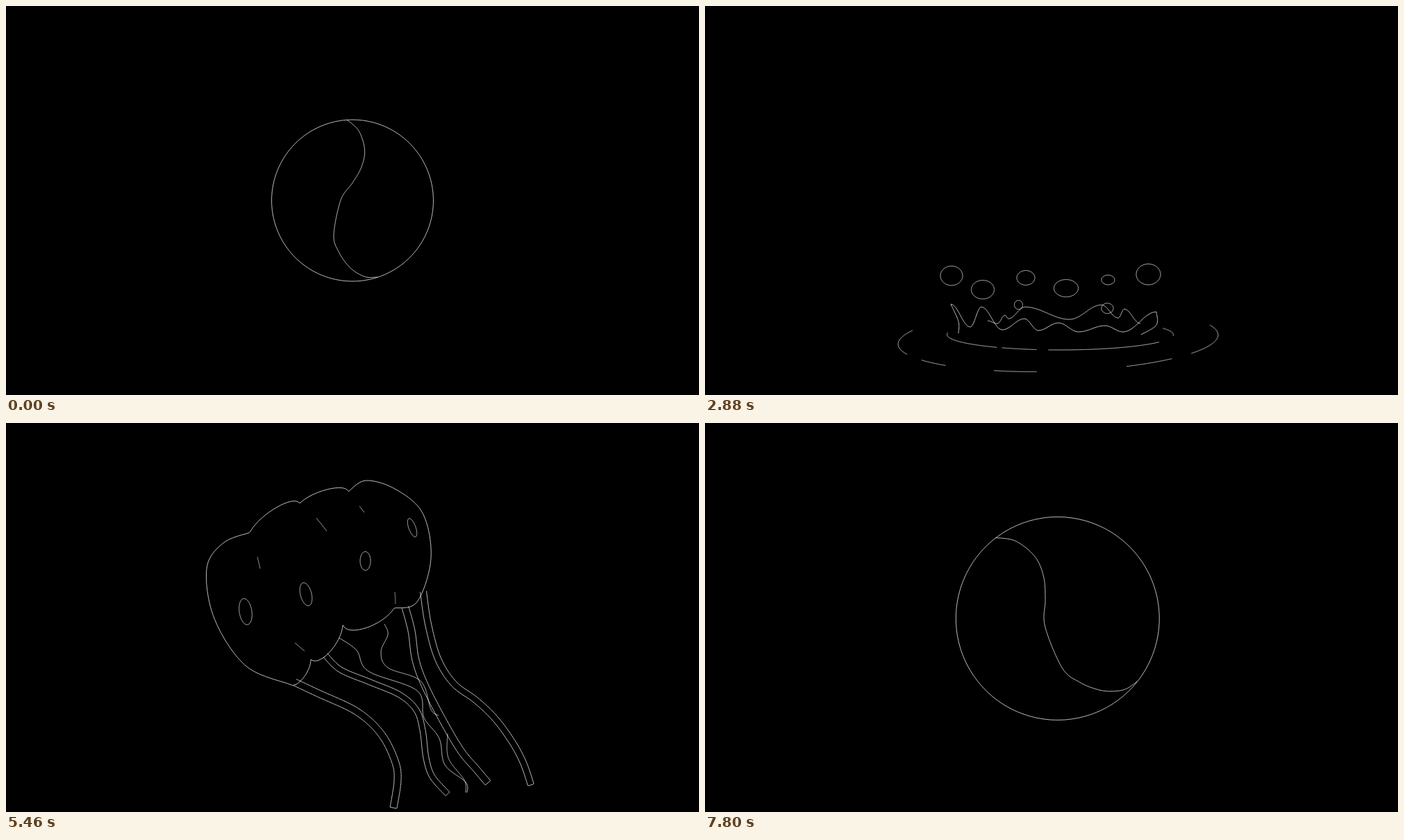
Recreate the animation shown at these times as an HTML page with a canvas. Size 998x561 px, loop 7.86 s.

```html
<!DOCTYPE html>
<html lang="en">
<head>
<meta charset="utf-8">
<title>Line morph</title>
<style>
html, body { margin: 0; width: 100%; height: 100%; overflow: hidden; background: #000; }
canvas { display: block; }
</style>
</head>
<body>
<canvas id="stage" width="998" height="561"></canvas>
<script>
const ctx = document.getElementById('stage').getContext('2d');
const LOOP = 7860, STEP = 60, SAMPLES = 400;
const clamp = (v, lo = 0, hi = 1) => Math.max(lo, Math.min(hi, v));
const mix = (a, b, u) => a + (b - a) * u;
const ease = u => u * u * (3 - 2 * u);
const range = (n, make) => Array.from({ length: n }, (_, k) => make(k));
const around = (p, x, y, s, angle = 0) => {
  const c = Math.cos(angle) * s, n = Math.sin(angle) * s, dx = p[0] - x, dy = p[1] - y;
  return [x + dx * c - dy * n, y + dx * n + dy * c];
};

// Spread points evenly along a polyline so that any two strokes can be blended.
function resample(line) {
  const at = [0];
  for (let i = 1; i < line.length; i++)
    at.push(at[i - 1] + Math.hypot(line[i][0] - line[i - 1][0], line[i][1] - line[i - 1][1]));
  const total = at[at.length - 1];
  let i = 1;
  return range(SAMPLES, k => {
    const d = total * k / (SAMPLES - 1);
    while (i < line.length - 1 && at[i] < d) i++;
    const u = clamp((d - at[i - 1]) / (at[i] - at[i - 1] || 1));
    return [mix(line[i - 1][0], line[i][0], u), mix(line[i - 1][1], line[i][1], u)];
  });
}

// Smooth stroke through "x,y" key points; "!" marks a corner.
function curve(text) {
  const pts = text.trim().split(/\s+/).map(s => [...s.replace('!', '').split(',').map(Number), s.endsWith('!')]);
  return pts.slice(1).flatMap((c, i) => {
    const b = pts[i], a = b[2] ? b : pts[i - 1] || b, d = c[2] ? c : pts[i + 2] || c;
    return range(13, k => {
      const u = k / 12;
      return [0, 1].map(j => b[j] + u / 2 * (c[j] - a[j] +
        u * (2 * a[j] - 5 * b[j] + 4 * c[j] - d[j] + u * (3 * (b[j] - c[j]) + d[j] - a[j]))));
    });
  });
}

// Ellipse or part of one, angles in degrees.
const oval = (x, y, rx, ry, tilt = 0, from = -90, to = 270) => range(91, k => {
  const a = mix(from, to, k / 90) * Math.PI / 180;
  return around([x + rx * Math.cos(a), y + ry * Math.sin(a)], x, y, 1, tilt);
});

// Cosine waves through alternating crests and troughs.
const wave = pts => pts.slice(1).flatMap((b, i) => range(13, k =>
  [mix(pts[i][0], b[0], k / 12), mix(pts[i][1], b[1], .5 - Math.cos(k / 12 * Math.PI) / 2)]));

// Row of lobes hanging between corners, fuller at their far end.
const scallop = (pts, bulge = .32) => pts.slice(1).flatMap((b, i) => {
  const a = pts[i], dx = b[0] - a[0], dy = b[1] - a[1];
  const c = [a[0] + .3 * dx + bulge * dy, a[1] + .3 * dy - bulge * dx];
  const d = [b[0] + bulge * dy, b[1] - bulge * dx];
  return range(17, k => {
    const u = k / 16, v = 1 - u;
    return [0, 1].map(j => v * v * v * a[j] + 3 * u * v * (v * c[j] + u * d[j]) + u * u * u * b[j]);
  });
});

// Two parallel edges along a centre line, joined at the tip.
function ribbon(text, half) {
  const mid = resample(curve(text));
  const edge = side => mid.map((p, i) => {
    const a = mid[Math.max(0, i - 2)], b = mid[Math.min(SAMPLES - 1, i + 2)];
    const s = side * half / Math.hypot(b[0] - a[0], b[1] - a[1]);
    return [p[0] - (b[1] - a[1]) * s, p[1] + (b[0] - a[0]) * s];
  });
  return [...edge(1), ...edge(-1).reverse()];
}

// Right half plus its reflection; the reflected shoulder may sag a little.
const mirror = (half, sag = 0) => [...half, ...half.map(([x, y]) =>
  [1022 - x, y + sag * Math.sin(Math.PI * clamp(y / 300))]).reverse()];

const scene = (lines, move) => ({ lines: lines.map(resample), move });

const ball = scene([
  oval(499, 280.5, 116.5, 116.5),
  curve('491,164 508,180 516.5,207 512,232 499,255 482,280 472,331 480,356 492,373.5 504,384 519,391 535,391')
], (p, i, t) => {
  const d = t > LOOP / 2 ? t - LOOP : t;
  const r = 116.5 - clamp(d, -330, 60) / 2;
  const sway = Math.sin(clamp(-d / 300) * Math.PI);
  const q = around(p, 499, 280.5, r / 116.5, i ? clamp(d, -600, 480) / STEP * .585 : 0);
  return [q[0] + 15 * sway, q[1] + 2.4 * sway];
});

const glass = scene([
  mirror(curve(`511,8.5 530,9.5 590,6.5 656,0 706,-14! 711,25 692,98 668,128 630,150 592,168 572,190 563.5,214
    568,242 583,269 615,290 655,309 690,338 710,375 719,430 713,480! 647,495 530,501 511,500`), 10),
  mirror(curve('511,70.5 548,69.5 595,75 645,86! 600,127 545,176 511,201!')),
  curve('511,304! 553,340 600,389 668,471! 570,479.5 430,481 337,466! 400,398 442,358 511,304!'),
  ...range(6, k => oval(510.5 + 2 * Math.sin(k * 2.2 - 3), 208 + 18.6 * k, 1.3,
    2.5 + 5 * Math.sin(k * Math.PI / 5) ** 4))
], (p, i, t) => {
  if (i > 2) p = [p[0], p[1] + Math.max(0, t - 1740) / STEP * 7 % 15];
  const u = ease(clamp((1680 - t) / 840));
  return around(p, 511, 240, 1 + u * .5, -u * Math.PI / 2);
});

const inner = (from, to) => oval(511.5, 474, 163, 22, 0, from, to);
const outer = (from, to) => oval(508.5, 481, 230.5, 46, -.03, from, to);
const splash = scene([
  [...curve('365,472 365,455 354,430!'), ...wave([[354, 430], [382, 463], [398, 434], [428, 467], [460, 451],
    [480, 468], [509, 457], [538, 470], [576, 461], [602, 470], [650, 441]]), ...curve('650,441! 650,460 628,474')],
  wave([[407, 454], [421, 458], [432, 446], [437, 451], [461, 434], [525, 452], [571, 431], [595, 450],
    [604, 437], [627, 458]]),
  oval(355, 389, 16, 14), oval(400, 409, 16.5, 13.5), oval(462, 392, 13, 10.5), oval(520, 407, 17.5, 12.5),
  oval(580.5, 395, 9.5, 7), oval(638.5, 387, 17.5, 15), oval(451.5, 431, 6, 6.5), oval(579.5, 436, 8.5, 7.5),
  outer(205, 161), outer(149, 135), outer(114, 98), outer(65, 45), outer(34, -18),
  inner(188, 124), inner(121, 102), inner(96, 29), inner(-25, 5)
], (p, i, t) => {
  const d = clamp(t - 2880, -400, 480);
  if (i < 2) return [p[0], 480 + (p[1] - 480) * (1 - d * .0008)];
  if (i < 8) return [p[0], p[1] - d * .35 + d * d * .001];
  if (i < 10) return p;
  return [510 + (p[0] - 510) * (1 + d * .001), 498 + (p[1] - 498) * (1 + d * .0005)];
});

const sprout = scene([
  curve(`491,502! 492,470 500,430 499,375 496,348 486,338 472,342 445,357 418,363.5 389,351 378,325 383,300!
    400,323 438,338.5 486,335 496,339! 513,312 535,298 564,284 577,256! 590,267 596,300 580,322 556,333.5
    530,326 514,316! 500,333 497,350 504,400 506,430 501,470 511,489 515,501! 503,505 491,502!`)
], (p, i, t) => around(p, 503, 503, 1 + clamp((t - 3900) / 750, -.64, .4)));

const jelly = scene([
  [
    ...curve('409,377! 345,350 300,282 289,210 313,173 351,158!'),
    ...scallop([[351, 158], [423, 116], [493, 99]], .19),
    ...curve('493,99! 518,83 560,95 600,130 612,195 592,258 559,267!'),
    ...scallop([[559, 267], [485, 291], [439, 341], [409, 377]], .25)
  ],
  oval(345, 272, 9, 19, -.15), oval(432, 247, 8, 17, -.25), oval(517.5, 199, 7.5, 13.5), oval(585, 151, 5, 14, -.35),
  ribbon('416,374 450,390 505,416 540,448 560,487 564,515 558,555', 5),
  ribbon('460,335 482,356 525,374 567,392 591,414 600,443 605,483 614,510 636,535', 4),
  curve('480,310 505,328 522,358 592,386 602,425 624,455 632,493 662,518 664,533'),
  curve('545,290 550,305 540,330 550,353 597,372 612,413 623,422'),
  ribbon('575,266 584,300 590,342 604,380 632,434 656,474 678,500 694,519', 5),
  ribbon('601,243 608,290 622,340 645,376 677,400 705,427 729,460 745,490 756,522', 4.5),
  ...['636,448 637,483 660,515 662,533', '362,193 366,210', '447,137 462,156', '509,120 516,129',
    '560,244 561,261', '416,317 430,329'].map(curve)
], (p, i, t) => around(p, 530, 300, 1 - .4 * clamp((5460 - t) / 600)));

const frill = range(9, k => [625 - 56 * k + 1.75 * k * k, 84 + 19 * k + .68 * k * k]);
const swimmer = scene([
  [
    ...curve('285,332! 248,295 243,250 295,155 380,80 500,25 590,15 645,33 670,55!'),
    ...scallop([[670, 55], ...frill]),
    ...curve('291,279! 290,310 285,332!')
  ],
  curve('248,228 270,252 279,270 249,297'),
  curve('339,144! 398,143 398,167 350,203 318,212 328,175 339,144!'),
  curve('487,57! 540,62 544,85 500,116 470,117 476,85 487,57!'),
  curve('599,15 603,50 630,57 662,46'),
  ribbon('289,322 283,350 292,365 318,357 352,345 410,341 460,359 505,393 550,447 590,506 616,575', 5),
  ribbon('342,240 339,275 352,290 440,295 492,323 522,360 557,406 590,448 612,493 634,528 648,575', 5),
  curve('378,216 425,216 445,260 510,279 516,345'),
  curve('532,137 521,188 533,207 526,258 559,290 549,345 573,354'),
  ribbon('551,128 571,168 569,220 565,285 580,360 595,415 615,464 645,518 683,575', 6),
  ribbon('643,91 662,112 663,140 638,186 615,232 610,286 619,340 638,383 668,447 705,510 746,575', 7),
  scallop([[536, 374], [587, 435]]), scallop([[602, 459], [620, 491]]), scallop([[649, 549], [667, 560]], 0),
  scallop([[587, 360], [602, 412]]), scallop([[616, 448], [638, 492]]), scallop([[659, 528], [674, 553]])
], (p, i, t) => {
  const d = clamp(t - 6660, 0, 700);
  return [p[0] - d * .35, p[1] - d * .08];
});

// from, to, morph start, morph end
const morphs = [
  [ball, glass, 240, 1080], [glass, splash, 1860, 2640], [splash, sprout, 3060, 3600],
  [sprout, jelly, 4080, 5040], [jelly, swimmer, 5460, 6540], [swimmer, ball, 6780, 7440]
];

function shrink(line, s) {
  const [x, y] = [0, 1].map(j => line.reduce((sum, p) => sum + p[j], 0) / SAMPLES);
  return line.map(p => around(p, x, y, s));
}

function trace(line) {
  ctx.beginPath();
  line.forEach(p => ctx.lineTo(p[0], p[1]));
  ctx.stroke();
}

function draw(t) {
  ctx.fillStyle = '#000';
  ctx.fillRect(0, 0, 998, 561);
  ctx.strokeStyle = '#fff';
  ctx.lineWidth = .75;
  ctx.lineJoin = 'round';

  const [from, to, start, end] = morphs.filter(m => t >= m[2]).pop() || morphs[0];
  const u = ease(clamp((t - start) / (end - start)));
  const pose = (s, i) => s.lines[i] && s.lines[i].map(p => s.move(p, i, t));
  const count = Math.max(from.lines.length, to.lines.length);
  for (let i = 0; i < count; i++) {
    const a = u < 1 && pose(from, i), b = u > 0 && pose(to, i);
    if (a && b) trace(a.map((p, k) => [mix(p[0], b[k][0], u), mix(p[1], b[k][1], u)]));
    else if (a) trace(shrink(a, 1 - u));
    else if (b) trace(shrink(b, u));
  }
}

const began = performance.now();
function frame() {
  draw(Math.floor((performance.now() - began) % LOOP / STEP) * STEP);
  requestAnimationFrame(frame);
}
frame();
</script>
</body>
</html>
```
